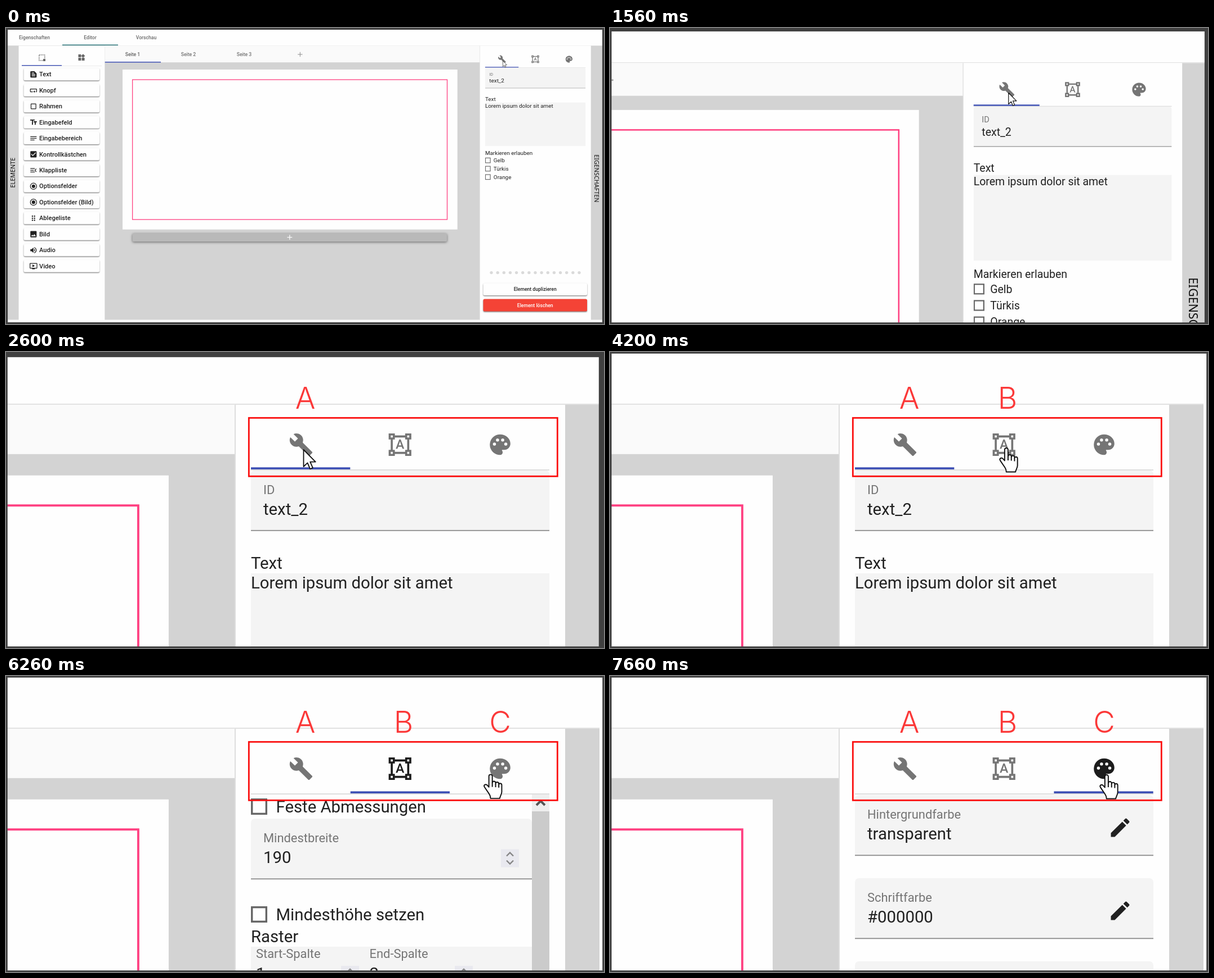
An HTML page with a canvas for the animation above (8 s loop, 1062 by 527 pixels).

```html
<!DOCTYPE html>
<html lang="de">
<head>
<meta charset="utf-8">
<title>Editor</title>
<style>
html, body { margin: 0; width: 100%; height: 100%; overflow: hidden; background: #fefefe; }
canvas { display: block; }
</style>
</head>
<body>
<canvas id="stage" width="1062" height="527"></canvas>
<script>
const W = 1062, H = 527, LOOP = 8000, ZOOM = 2.97;
const ctx = document.getElementById('stage').getContext('2d');

const WHITE = '#fefefe', GREY = '#d3d3d3', LINE = '#dedede', FIELD = '#f4f4f4';
const BLUE = '#3f51b5', INK = '#212121', MUTED = '#757575', DARK = '#404040';

const dot = (x, y, r) => `M${x - r} ${y}a${r} ${r} 0 1 0 ${2 * r} 0a${r} ${r} 0 1 0 ${-2 * r} 0z`;
const grip = [6, 12, 18].map(y => dot(9, y, 2) + dot(15, y, 2)).join('');

// Icons on a 24 unit grid
const icons = {
  wrench: 'M22.7 19l-9.1-9.1c.9-2.3.4-5-1.5-6.9-2-2-5-2.4-7.4-1.3L9 6 6 9 1.6 4.7C.4 7.1.9 10.1 2.9 12.1c1.9 1.9 4.6 2.4 6.9 1.5l9.1 9.1c.4.4 1 .4 1.4 0l2.3-2.3c.5-.4.5-1.1.1-1.4z',
  shapes: 'M23 7V1h-6v2H7V1H1v6h2v10H1v6h6v-2h10v2h6v-6h-2V7zM3 3h2v2H3zm2 18H3v-2h2zm12-2H7v-2H5V7h2V5h10v2h2v10h-2zm4 2h-2v-2h2zM19 5V3h2v2zm-5.27 9h-3.49l-.73 2H7.89l3.4-9h1.4l3.41 9h-1.63zm-3.04-1.26h2.61L12 8.91z',
  palette: 'M12 2a10 10 0 0 0 0 20c1.4 0 2.5-1.1 2.5-2.5 0-.6-.2-1.2-.6-1.7-.4-.5 0-.8.3-.8H16a6 6 0 0 0 6-6c0-5-4.5-9-10-9z'
    + dot(6.5, 11.5, 1.5) + dot(9.5, 7.5, 1.5) + dot(14.5, 7.5, 1.5) + dot(17.5, 11.5, 1.5),
  pencil: 'M3 17.25V21h3.75L17.81 9.94l-3.75-3.75zM20.71 7.04c.39-.39.39-1.02 0-1.41l-2.34-2.34c-.39-.39-1.02-.39-1.41 0l-1.83 1.83 3.75 3.75z',
  widgets: 'M13 13v8h8v-8zM3 21h8v-8H3zM3 3v8h8V3zm13.66-1.31L11 7.34 16.66 13l5.66-5.66z',
  page: 'M20.4 8.4l-4.8-4.8c-.4-.4-.9-.6-1.4-.6H5c-1.1 0-2 .9-2 2v14c0 1.1.9 2 2 2h14c1.1 0 2-.9 2-2V9.8c0-.5-.2-1-.6-1.4zM7 7h7v2H7zm10 10H7v-2h10zm0-4H7v-2h10z',
  button: 'M22 9v6c0 1.1-.9 2-2 2h-1v-2h1V9H4v6h6v2H4c-1.1 0-2-.9-2-2V9c0-1.1.9-2 2-2h16c1.1 0 2 .9 2 2zm-7.5 10l1.1-2.4 2.4-1.1-2.4-1.1-1.1-2.4-1.1 2.4-2.4 1.1 2.4 1.1z',
  square: 'M18 4H6c-1.1 0-2 .9-2 2v12c0 1.1.9 2 2 2h12c1.1 0 2-.9 2-2V6c0-1.1-.9-2-2-2zm0 14H6V6h12z',
  letters: 'M2.5 4v3h5v12h3V7h5V4zm19 5h-9v3h3v7h3v-7h3z',
  notes: 'M3 18h12v-2H3zM3 6v2h18V6zm0 7h18v-2H3z',
  check: 'M19 3H5c-1.1 0-2 .9-2 2v14c0 1.1.9 2 2 2h14c1.1 0 2-.9 2-2V5c0-1.1-.9-2-2-2zm-9 14l-5-5 1.4-1.4 3.6 3.6 7.6-7.6L19 8z',
  dropdown: 'M3 18h13v-2H3zM3 6v2h13V6zm0 7h10v-2H3zM21 15.6L17.4 12 21 8.4 19.6 7l-5 5 5 5z',
  radio: dot(12, 12, 10) + dot(12, 12, 8) + dot(12, 12, 5),
  grip,
  image: 'M21 19V5c0-1.1-.9-2-2-2H5c-1.1 0-2 .9-2 2v14c0 1.1.9 2 2 2h14c1.1 0 2-.9 2-2zM8.5 13.5l2.5 3 3.5-4.5 4.5 6H5z',
  sound: 'M3 9v6h4l5 5V4L7 9zm13.5 3c0-1.8-1-3.3-2.5-4v8c1.5-.7 2.5-2.2 2.5-4zM14 3.2v2.1c2.9.9 5 3.5 5 6.7s-2.1 5.8-5 6.7v2.1c4-.9 7-4.5 7-8.8s-3-7.9-7-8.8z',
  video: 'M21 3H3c-1.1 0-2 .9-2 2v12c0 1.1.9 2 2 2h5v2h8v-2h5c1.1 0 2-.9 2-2V5c0-1.1-.9-2-2-2zm0 14H3V5h18zm-5-6l-7 4V7z'
};
for (const name in icons) icons[name] = new Path2D(icons[name]);

const arrow = new Path2D('M0 0V16.4L3.8 12.8 6.3 18.7 8.9 17.6 6.4 11.8H11.6z');
const hand = new Path2D('M6.5 1c-1 0-1.6.7-1.6 1.6V12.5l-1.4-1.6c-.8-.9-2-1-2.6-.4c-.6.6-.4 1.4.1 2.1l4.2 6.2c.6.9 1.2 2.8 1.2 4h8.4c0-1.4 1.8-3.8 1.8-5.8v-6.4c0-1-.6-1.5-1.4-1.5s-1.3.6-1.3 1.4v-.9c0-1.1-.7-1.6-1.5-1.6s-1.4.6-1.4 1.5v-.7c0-1-.6-1.6-1.5-1.6s-1.5.7-1.5 1.5V2.6c0-.9-.6-1.6-1.5-1.6z');
const knuckles = new Path2D('M8 8.7V12.3M11 9.5V12.6M13.9 10.5V13');

const tools = [
  ['page', 'Text'], ['button', 'Knopf'], ['square', 'Rahmen'], ['letters', 'Eingabefeld'],
  ['notes', 'Eingabebereich'], ['check', 'Kontrollkästchen'], ['dropdown', 'Klappliste'],
  ['radio', 'Optionsfelder'], ['radio', 'Optionsfelder (Bild)'], ['grip', 'Ablegeliste'],
  ['image', 'Bild'], ['sound', 'Audio'], ['video', 'Video']
];

const clamp = x => Math.max(0, Math.min(1, x));
const span = (t, a, b) => clamp((t - a) / (b - a));
const sine = x => (1 - Math.cos(Math.PI * x)) / 2;
const smooth = x => x * x * (3 - 2 * x);
const mix = (a, b, p) => a + (b - a) * p;

// cubic-bezier(.35, 0, .25, 1)
function glide(x) {
  let lo = 0, hi = 1;
  for (let i = 0; i < 24; i++) {
    const u = (lo + hi) / 2, v = 1 - u;
    if (1.05 * v * v * u + 0.75 * v * u * u + u * u * u < x) lo = u; else hi = u;
  }
  return smooth(lo);
}

function rect(x0, y0, x1, y1, color) {
  ctx.fillStyle = color;
  ctx.fillRect(x0, y0, x1 - x0, y1 - y0);
}

function round(x0, y0, x1, y1, r, color) {
  ctx.fillStyle = color;
  ctx.beginPath();
  ctx.roundRect(x0, y0, x1 - x0, y1 - y0, r);
  ctx.fill();
}

function text(str, x, y, size, color = INK, weight = 400, align = 'left', family = 'Roboto') {
  ctx.font = `${weight} ${size}px ${family}, sans-serif`;
  ctx.textAlign = align;
  ctx.fillStyle = color;
  ctx.fillText(str, x, y);
}

function line(points, width, color) {
  ctx.strokeStyle = color;
  ctx.lineWidth = width;
  ctx.beginPath();
  points.forEach(([x, y]) => ctx.lineTo(x, y));
  ctx.stroke();
}

function icon(name, cx, cy, scale, color) {
  ctx.save();
  ctx.translate(cx - 12 * scale, cy - 12 * scale);
  ctx.scale(scale, scale);
  ctx.fillStyle = color;
  ctx.fill(icons[name], 'evenodd');
  ctx.restore();
}

function plus(x, y, r, width, color) {
  line([[x - r, y], [x + r, y]], width, color);
  line([[x, y - r], [x, y + r]], width, color);
}

function raised(x0, y0, x1, y1, color, blur = 2) {
  ctx.save();
  ctx.shadowColor = 'rgba(0,0,0,.5)';
  ctx.shadowBlur = blur;
  ctx.shadowOffsetY = 1.2;
  round(x0, y0, x1, y1, 2.5, color);
  ctx.restore();
}

function sideLabel(str, x, y, angle) {
  ctx.save();
  ctx.translate(x, y);
  ctx.rotate(angle);
  text(str, 0, 0, 10.8, '#111', 400, 'left', '"Noto Sans"');
  ctx.restore();
}

// Sets a view anchored at the top right corner
function view(scale) {
  ctx.setTransform(scale, 0, 0, scale, W * (1 - scale), 0);
}

function drawLeft() {
  text('Eigenschaften', 50.5, 19.5, 8.6, '#6a6a6a', 500, 'center');
  text('Editor', 149.5, 19.5, 8.6, '#6a6a6a', 500, 'center');
  text('Vorschau', 249, 19.5, 8.6, '#6a6a6a', 500, 'center');
  rect(3, 31, 1059.3, 31.6, LINE);
  rect(100, 29.6, 199, 31, '#1c6b70');

  rect(3, 31.5, 22.5, 519.5, GREY);
  sideLabel('ELEMENTE', 16.2, 284.5, -Math.PI / 2);

  ctx.setLineDash([1.8, 1.1]);
  ctx.strokeStyle = '#666';
  ctx.lineWidth = 1.3;
  ctx.strokeRect(58.8, 47.8, 10, 10);
  ctx.setLineDash([]);
  rect(66, 55, 70, 59, '#666');
  icon('widgets', 134, 52.5, 0.6155, '#666');
  rect(28, 67.2, 170, 67.8, LINE);
  rect(28, 66, 99, 67.4, BLUE);

  tools.forEach(([name, label], i) => {
    const y = 82.3 + i * 28.45;
    raised(31.5, y - 11, 166, y + 11, WHITE);
    icon(name, 48.8, y + 0.3, 0.6155, INK);
    text(label, 59, y + 4, 11.08, INK, 500);
  });
  rect(175, 31.5, 175.7, 519.5, LINE);
}

function drawCanvasArea() {
  rect(175.7, 31.6, 841.5, 61.4, '#fafafa');
  ['Seite 1', 'Seite 2', 'Seite 3'].forEach((label, i) =>
    text(label, 225 + i * 99, 49.7, 8.6, i ? '#717171' : '#606060', 500, 'center'));
  plus(522.3, 47, 4.2, 1, '#8c8c8c');
  rect(175.7, 61.2, 841.5, 519.5, GREY);
  rect(175.7, 60, 275, 61.5, BLUE);
  rect(207, 74, 801.7, 358.7, WHITE);
  ctx.strokeStyle = '#ff4081';
  ctx.lineWidth = 1.3;
  ctx.strokeRect(224.6, 92, 558.9, 249);
  raised(224.5, 365.5, 783, 380.3, '#b9b9b9', 4);
  plus(503.8, 372.6, 4.4, 1.2, WHITE);
}

function field(y, label, value, right = 965) {
  round(435, y, right, y + 107, [7, 7, 0, 0], FIELD);
  rect(435, y + 106.4, right, y + 108.2, '#8c8c8c');
  text(label, 457, y + 42, 21.9, MUTED);
  text(value, 457, y + 79, 29.3);
}

function checkbox(y, label) {
  ctx.strokeStyle = '#666';
  ctx.lineWidth = 3.4;
  ctx.strokeRect(436.7, y - 12.8, 25.6, 25.6);
  text(label, 479.5, y + 10.5, 29.3);
}

function spinner(x, y) {
  rect(x - 16, y - 16, x + 16, y + 16, '#e9e9ef');
  for (const d of [-1, 1])
    line([[x - 6, y + 4 * d], [x, y + 10 * d], [x + 6, y + 4 * d]], 2.4, '#858585');
}

const bodies = [
  () => {
    field(210.5, 'ID', 'text_2');
    text('Text', 435, 386, 29.3);
    rect(435, 394, 965, 624, FIELD);
    text('Lorem ipsum dolor sit amet', 435, 421, 29.3);
    text('Markieren erlauben', 435, 670.5, 29.3);
    ['Gelb', 'Türkis', 'Orange'].forEach((label, i) => checkbox(700 + i * 44, label));
  },
  () => {
    checkbox(232.5, 'Feste Abmessungen');
    field(254, 'Mindestbreite', '190', 934);
    spinner(895, 324.5);
    checkbox(424.5, 'Mindesthöhe setzen');
    text('Raster', 435, 474, 29.3);
    rect(435, 482, 934, 600, FIELD);
    text('Start-Spalte', 444, 501.5, 21.9, MUTED);
    text('End-Spalte', 645.5, 501.5, 21.9, MUTED);
    text('1', 444, 540, 29.3);
    text('2', 645.5, 540, 29.3);
    spinner(611, 532);
    spinner(813, 532);
    rect(934, 211, 965, 241, '#eeeeee');
    rect(934, 241, 965, 1300, '#cbcbcb');
    line([[942, 230], [949.5, 222.5], [957, 230]], 4, '#555');
  },
  () => {
    field(212, 'Hintergrundfarbe', 'transparent');
    field(360, 'Schriftfarbe', '#000000');
    field(508, 'Schriftart', 'Roboto');
    icon('pencil', 906, 270, 1.828, INK);
    icon('pencil', 906, 418, 1.828, INK);
  }
];

// Panel coordinates are those of the fully zoomed view
function drawPanel(pos, active) {
  rect(407, 94, 993, 1543, WHITE);
  rect(406, 94, 408, 1543, LINE);
  rect(993, 94, 1054, 1543, GREY);

  ['wrench', 'shapes', 'palette'].forEach((name, i) =>
    icon(name, [524, 699.7, 877.5][i], 165, 1.828, i === active ? '#1c1c1c' : MUTED));
  rect(435, 209, 965, 211, LINE);

  ctx.save();
  ctx.beginPath();
  ctx.rect(435, 211, 530, 1080);
  ctx.clip();
  bodies.forEach((body, i) => {
    if (Math.abs(i - pos) >= 1) return;
    ctx.save();
    ctx.translate((i - pos) * 530, 0);
    body();
    ctx.restore();
  });
  ctx.restore();

  const x = 435 + pos * 176.7;
  rect(x, 205.3, x + 176.3, 209, BLUE);
}

function drawPanelFoot() {
  for (let i = 0; i < 15; i++) {
    ctx.fillStyle = '#dadada';
    ctx.beginPath();
    ctx.arc(862 + i * 11.14, 435.6, 2.7, 0, 7);
    ctx.fill();
  }
  raised(847.5, 454.3, 1032, 476, WHITE);
  text('Element duplizieren', 939.7, 468, 8.62, INK, 500, 'center');
  raised(847.5, 482.6, 1032, 504.5, '#f44336');
  text('Element löschen', 939.7, 496.6, 8.62, '#fff', 500, 'center');
  sideLabel('EIGENSCHAFTEN', 1044.6, 225.3, Math.PI / 2);
}

function drawCursor(t) {
  const toB = smooth(span(t, 3380, 3970));
  const toC = 1 - Math.pow(1 - span(t, 6010, 6700), 4.7);
  const x = mix(mix(528.5, 703, toB), 881, toC);
  const y = mix(mix(174, 170, toB), 175, toC) + 9 * Math.sin(Math.PI * toB);
  const pointing = t >= 4160;
  ctx.save();
  ctx.translate(x, y);
  ctx.lineJoin = 'round';
  ctx.fillStyle = '#fff';
  ctx.strokeStyle = '#111';
  if (pointing) {
    ctx.scale(1.95, 1.95);
    ctx.translate(-6, -0.5);
  } else {
    ctx.scale(1.83, 1.83);
  }
  const shape = pointing ? hand : arrow;
  ctx.lineWidth = 1;
  ctx.fill(shape);
  ctx.stroke(shape);
  if (pointing) ctx.stroke(knuckles);
  ctx.restore();
}

function drawMarks(t) {
  const fadeA = span(t, 2080, 2600);
  ctx.globalAlpha = fadeA;
  ctx.strokeStyle = '#fb0d0d';
  ctx.lineWidth = 2.8;
  ctx.strokeRect(431.3, 117.3, 548, 104);
  const letters = [['A', 531.5, fadeA], ['B', 706, span(t, 3400, 3850)], ['C', 877.5, span(t, 6000, 6260)]];
  for (const [letter, x, alpha] of letters) {
    ctx.globalAlpha = alpha;
    text(letter, x, 101, 53, '#fb3838', 300, 'center', 'Inter');
  }
  ctx.globalAlpha = 1;
}

function border(width) {
  ctx.strokeStyle = DARK;
  ctx.lineWidth = width;
  ctx.strokeRect(width / 2, width / 2, W - width, H - width);
}

function draw(t) {
  const scale = mix(1, ZOOM, sine(span(t, 1267, 1860)));
  const pos = glide(span(t, 5175, 5985)) + glide(span(t, 6838, 7648));
  const active = t >= 6860 ? 2 : t >= 5200 ? 1 : -1;

  ctx.setTransform(1, 0, 0, 1, 0, 0);
  rect(0, 0, W, H, WHITE);

  view(scale);
  drawLeft();
  drawCanvasArea();
  view(scale / ZOOM);
  drawPanel(pos, active);
  view(scale);
  drawPanelFoot();
  if (t < 3000) border(3.1);
  view(scale / ZOOM);
  drawCursor(t);

  view(1);
  drawMarks(t);
  border(2.8);
}

function tick() {
  draw(performance.now() % LOOP);
  requestAnimationFrame(tick);
}
tick();
</script>
</body>
</html>
```
